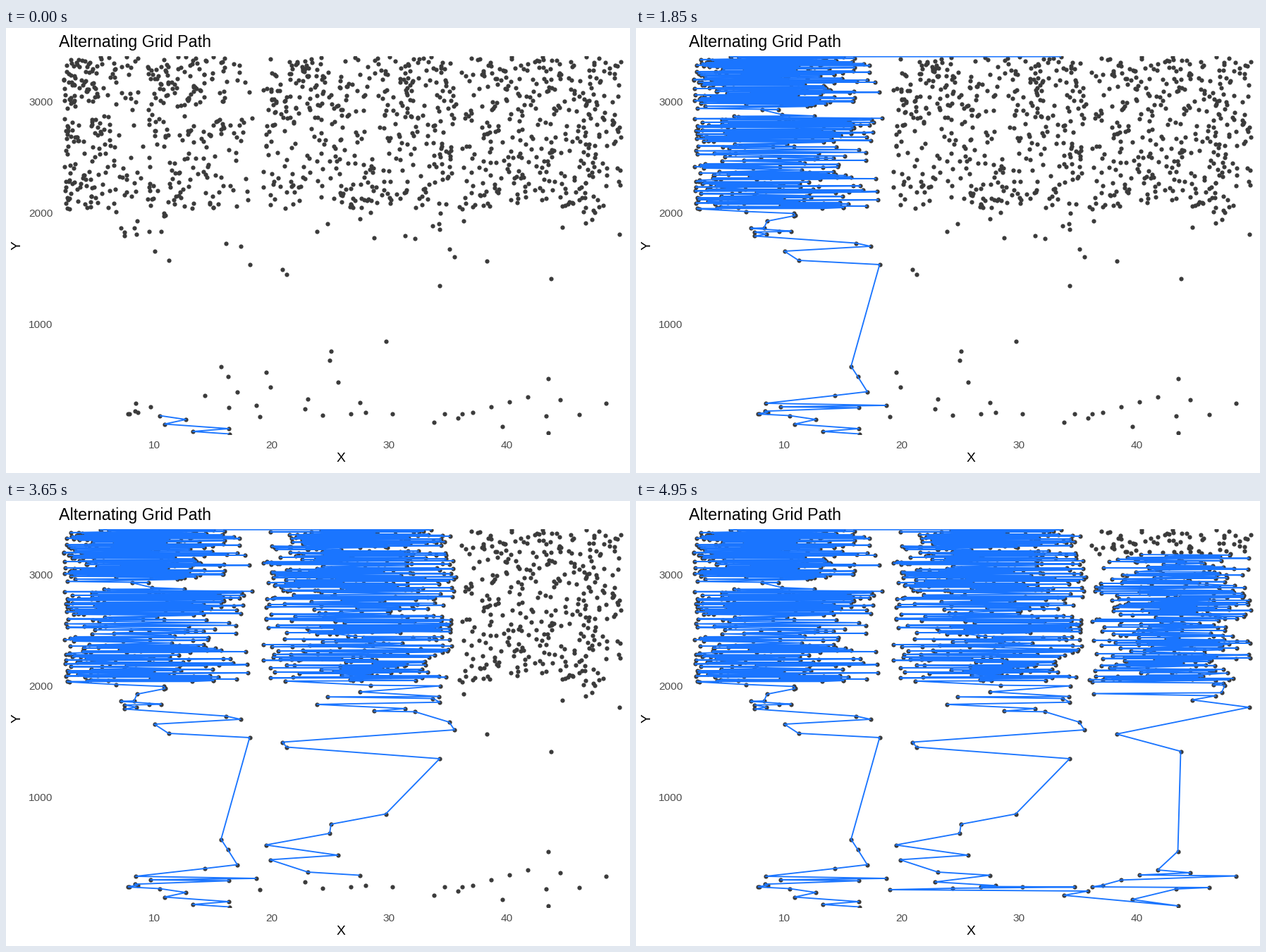
A matplotlib script for the animation above (5 s loop, 885 by 632 pixels).

```python
import numpy as np
import matplotlib.pyplot as plt
from matplotlib.animation import FuncAnimation

W, H, DPI = 885, 632, 100
LEFT, RIGHT, TOP, BOTTOM = 75, 875, 40, 577
FRAMES, STEP, FIRST = 100, 12, 6
DOT, BLUE, TICK = "#3b3b3b", "#1a75ff", "#4d4d4d"

plt.rcParams["font.family"] = "Liberation Sans"
plt.rcParams["path.simplify"] = False
rng = np.random.default_rng(12)


def shown(frame):
    """Number of path points visible at a frame."""
    return FIRST + STEP * frame


def scatter(n, x0, x1, y0, y1):
    return np.column_stack([rng.uniform(x0, x1, n), rng.uniform(y0, y1, n)])


def zigzag(start, stops, center, left, right, skew):
    """Dense rows: the stops say which y is reached at which count."""
    ys, counts = zip(*stops)
    n = counts[-1] - start
    y = np.interp(start + np.arange(n), counts, ys) + rng.uniform(-2.5, 2.5, n)
    y = np.sort(np.clip(y, 40.7, 257))
    if ys[0] > ys[-1]:
        y = y[::-1]
    side = np.cumsum(rng.random(n) < 0.7) % 2
    x = np.where(side, center + right * rng.beta(1, 1 + skew, n),
                 center - left * rng.beta(1 + 2 * skew, 1, n))
    return np.column_stack([x, y])


def by_height(*parts, upward):
    pts = np.vstack(parts)
    order = np.argsort(pts[:, 1])
    return pts[order[::-1] if upward else order]


# Key points of the sparse stretches, in pixels
low_a = by_height(
    [(316.5, 576.5), (265, 573), (316, 569), (225, 562.5), (255, 556), (218, 550.5),
     (354.5, 536), (184, 533), (281.5, 522), (328, 516.5), (314.5, 495),
     (305, 480.5), (345.5, 336), (230.5, 330), (210.5, 317), (332.5, 310),
     (312, 305.5)],
    scatter(6, 140, 326, 538, 549.5), scatter(12, 147, 230, 258, 298), upward=True)
low_b = by_height(
    [(628.5, 314), (636, 325), (392, 342.5), (398, 349.5), (615, 366),
     (538.5, 444.5), (461, 459), (459, 472), (368.5, 488.5), (470.5, 503),
     (374.5, 509.5), (428, 527), (501.5, 531.5), (359.5, 552), (641, 554),
     (607, 560)],
    scatter(6, 420, 634, 539, 551), scatter(11, 388, 628, 258, 303), upward=False)
low_c = by_height(
    [(768.5, 575), (704, 566), (766, 551), (812.5, 549), (647, 548), (851, 532.5),
     (786, 528), (768.5, 497.5), (772.5, 355.5), (681.5, 331), (869.5, 293),
     (789, 282.5), (649, 273.5)],
    np.linspace((662, 545.5), (740, 524), 4), scatter(5, 813, 836, 257, 279),
    upward=True)

# Dense stretches: up the first column, down the second, up the third
end_a = shown(37) - 1
a = zigzag(len(low_a),
           [(257, len(low_a)), (204, shown(11)), (160, shown(15)), (128, 262),
            (109, shown(22)), (57, shown(33)), (41, end_a)],
           200, 118, 157, 0.4)
crossing = [(603, 40.6)]
end_b = shown(65) + 72
b = zigzag(end_a + 1,
           [(41, end_a), (128, shown(54)), (217, shown(65)), (256, end_b)],
           502, 138, 136, 0)
start_c = end_b + len(low_b) + len(low_c)
c = zigzag(start_c,
           [(256, start_c), (217, shown(81)), (77, shown(99)), (41, shown(99) + 75)],
           757, 114, 116, 0)
path = np.vstack([low_a, a, crossing, b, low_b, low_c, c])

fig = plt.figure(figsize=(W / DPI, H / DPI), dpi=DPI, facecolor="white")
ax = fig.add_axes([LEFT / W, 1 - BOTTOM / H, (RIGHT - LEFT) / W, (BOTTOM - TOP) / H])
ax.set_xlim(LEFT, RIGHT)
ax.set_ylim(BOTTOM, TOP)
ax.axis("off")


def label(x, y, text, px, color="black", ha="center", va="center", **kw):
    ax.text(x, y, text, fontsize=px * 72 / DPI, color=color, ha=ha, va=va, **kw)


label(75, 27, "Alternating Grid Path", 23.2, ha="left", va="baseline")
label(475, 612, "X", 19.3)
label(16.5, 309, "Y", 19.3, rotation=90)
for i in range(1, 5):
    label(210.5 + 166.5 * (i - 1), 597, str(10 * i), 15.4, TICK, va="baseline")
for i in range(1, 4):
    label(66.5, 584 - 158 * i, str(1000 * i), 15.4, TICK, ha="right", va="baseline")

ax.plot(*path.T, "o", color=DOT, ms=4.5, mew=0, zorder=1, snap=False)
trail, = ax.plot([], [], color=BLUE, lw=1.35, zorder=2,
                 solid_joinstyle="round", solid_capstyle="butt")


def draw(frame):
    trail.set_data(*path[:shown(frame)].T)
    return trail,


anim = FuncAnimation(fig, draw, frames=FRAMES, interval=50, repeat=True,
                     repeat_delay=0, blit=False)
plt.show()
```
